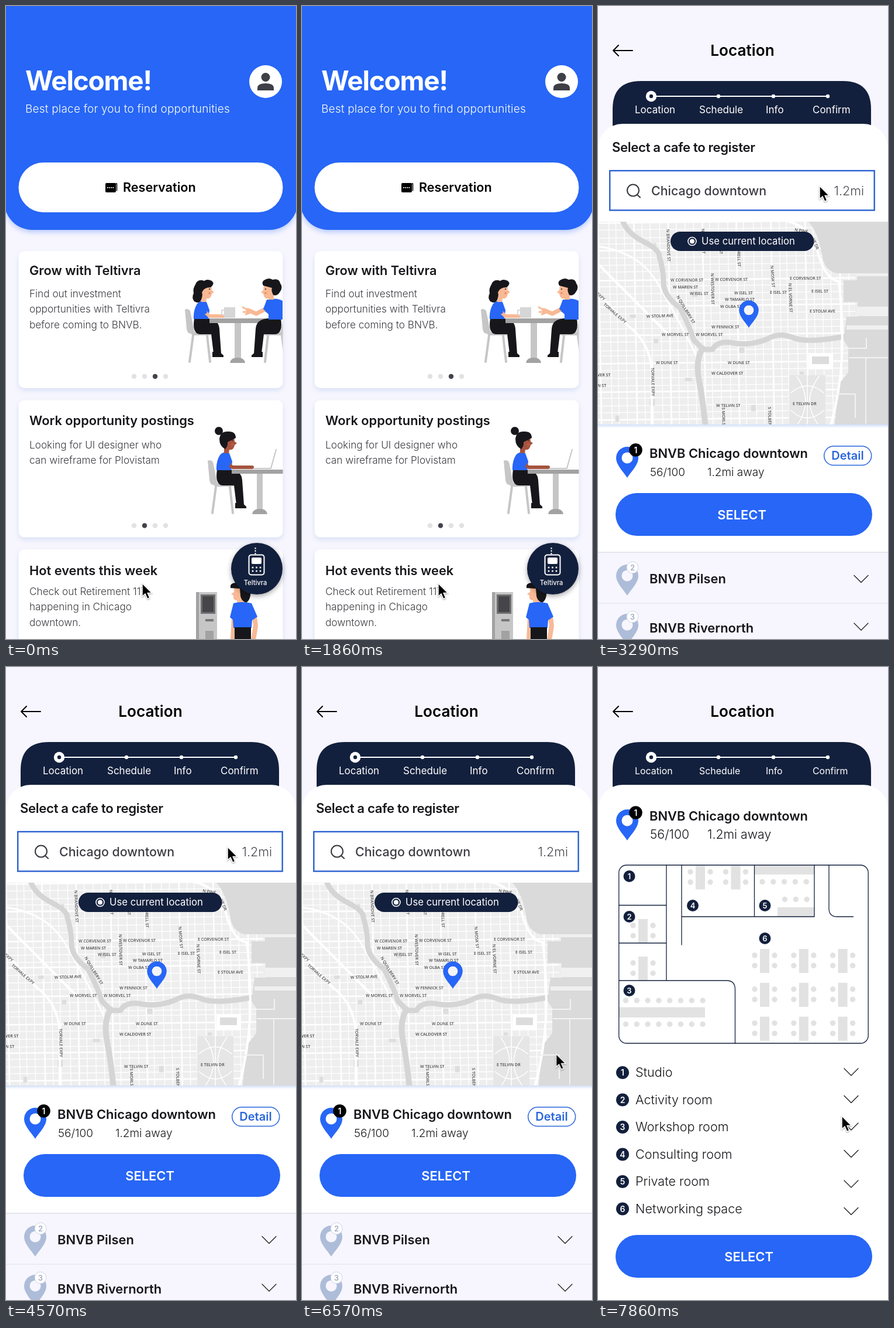
An HTML page that plays this animation: 496x1080 px, repeating every 8000 ms.

```html
<!DOCTYPE html>
<html lang="en">
<head>
<meta charset="utf-8">
<title>Reservation app</title>
<style>
html, body { margin: 0; width: 100%; height: 100%; overflow: hidden; background: #f7f6fe; }
svg { display: block; width: 100%; height: 100%; }
text { font-family: Inter, sans-serif; white-space: pre; }
.street { font: 600 7px "Open Sans", sans-serif; fill: #4a4a4a; }
.card { fill: #fff; filter: drop-shadow(0 4px 4px rgba(110, 150, 215, .22)); }
.line { fill: none; stroke-linecap: round; stroke-linejoin: round; }
</style>
</head>
<body>
<svg id="stage" viewBox="0 0 496 1080"></svg>
<script>
const BLUE = '#2766f6', NAVY = '#13203d', INK = '#17171b', GREY = '#e2e2e2';
const SKIN = '#f8b995', BROWN = '#a5533f', STEEL = '#a2a2a2', PALE = '#c6c6c6';
const DURATION = 8000, STEPS = 56;

const list = (items, fn) => items.map(fn).join('');
const range = n => [...Array(n).keys()];
const text = (x, y, str, size, weight = 400, fill = INK, extra = '') =>
  `<text x="${x}" y="${y}" font-size="${size}" font-weight="${weight}" fill="${fill}" ${extra}>${str}</text>`;
const middle = 'text-anchor="middle"';
const rect = (x, y, w, h, fill, rx = 0, extra = '') =>
  `<rect x="${x}" y="${y}" width="${w}" height="${h}" rx="${rx}" fill="${fill}" ${extra}/>`;
const circle = (x, y, r, fill, extra = '') => `<circle cx="${x}" cy="${y}" r="${r}" fill="${fill}" ${extra}/>`;
const path = (d, fill, extra = '') => `<path d="${d}" fill="${fill}" ${extra}/>`;
const line = (d, color, width) => `<path class="line" d="${d}" stroke="${color}" stroke-width="${width}"/>`;
const group = (transform, body) => `<g transform="${transform}">${body}</g>`;
const paragraph = (x, y, lines) => list(lines, (s, i) => text(x, y + i * 26.7, s, 17.2, 300, '#3c3c42'));
const chevron = (x, y) => line(`M${x} ${y}l12 12 12-12`, '#222', 1.4);
const badge = (x, y, r, n, fill, color = '#fff', size = 13, extra = '') =>
  circle(x, y, r, fill, extra) + text(x, y + size * .365, n, size, 600, color, middle);
const pin = (x, y, k, fill, hole) => group(`translate(${x} ${y}) scale(${k})`,
  path('M0 34C-5 25-19 13-19 0A19 19 0 0 1 19 0C19 13 5 25 0 34Z', fill) + circle(0, 0, 9.5, hole));
const button = (y, x) => rect(30, y, 439, 73, BLUE, 36.5) + text(x, y + 45, 'SELECT', 21.9, 600, '#fff', middle);

// ---------- people ----------
const seated =
  path('M306 518q5-3 9 2l8 39h-8q-5-1-6-8z', PALE) + rect(317, 556, 34, 6, PALE, 3) +
  line('M320 562l-6 45M344 562l5 45', PALE, 4) +
  path('M322 533h23q19 2 20 18l3 42h-13l-4-33h-20q-13-2-9-27z', INK) +
  path('M353 590h12l7 6v3h-19z', INK);
const torso = path('M327 508q8-8 16-3l5 14-2 15h-25q-1-15 6-26z', BLUE);
const face = skin => path('M334 476h17l1 9 4 3-4 3q-2 10-9 8l-1 6h-8z', skin) + circle(348, 490, 2, '#e8694f', 'opacity=".5"') +
  circle(348, 483, 1, INK);

const meeting =
  seated + torso + face(SKIN) +
  path('M350 480q8-6 2-11-8-4-13 0-11-4-15 6-5 8-3 15-4 8 1 14 9 5 12-3 3-9 1-12 3-9 15-9z', INK) +
  line('M338 520l10 9h34', SKIN, 6) + path('M331 509h9l4 15-7 3z', BLUE) +
  rect(373, 514, 19, 18, '#d6d6d6') + line('M373 519h-4v8h4', '#d6d6d6', 2) +
  rect(348, 533, 95, 8, STEEL) + rect(391, 541, 11, 60, PALE) + path('M383 609q1-9 13-9t13 9z', STEEL) +
  group('translate(792 0) scale(-1 1)', seated + path('M319 503q10-6 23-2l10 18-9 6v10h-24z', BLUE) + face(SKIN) +
    path('M352 477q4-7-3-10-7-4-13 0-11-3-13 6-5 7 0 14 5 9 12 6 4-8 2-12z', INK)) +
  line('M446 516l-18 9-14-6', SKIN, 7) + line('M414 519l-9-5M415 522h-9M418 523l-8 3', SKIN, 3) +
  path('M446 501h17l-6 18-8 7-9-9z', BLUE);

const designer = group('translate(39 258)',
  seated + torso + face(BROWN) + circle(325, 467, 7, INK) +
  path('M354 479q0-11-12-11-15-1-16 13 0 12 10 17 5-6 4-12z', INK) +
  line('M340 522l8 7h34', BROWN, 6) + path('M328 508q9-2 12 5l5 12-8 5z', BLUE)) +
  rect(386, 791, 90, 7, STEEL) + rect(429, 798, 10, 62, PALE) + path('M421 867q1-9 13-9t13 9z', STEEL) +
  line('M424 789h29l9-32', PALE, 2);

const visitor =
  rect(325, 1000, 36, 90, PALE) + rect(325, 1000, 5, 90, STEEL) + rect(333, 1004, 25, 33, '#6e6e6e') +
  rect(336, 1007, 19, 27, '#46464a') + rect(341, 1046, 14, 4, '#777') + rect(341, 1066, 14, 20, STEEL) +
  path('M390 992h18v14l-2 14h-10l-1-6q-7 0-6-8l-4-3 5-3z', SKIN) +
  path('M384 993q-2-8 8-9 22-6 26 10 2 18-7 24-8-2-10-11l-1-13z', INK) +
  line('M390 1042l-2 40M425 1042l2 16-4 24', SKIN, 8) +
  path('M389 1019q14-4 31 0l10 23-9 6-1 13h-31l-1-14-5-4z', BLUE) + rect(391, 1060, 28, 24, INK);

// ---------- home ----------
const dots = (y, active) => list(range(4), i => circle(219 + 18 * i, y, 4.2, i === active ? '#42424b' : GREY));
const callButton =
  circle(429, 960, 44, NAVY, 'style="filter:drop-shadow(0 3px 4px rgba(0,0,0,.35))"') +
  `<path d="M426.500 924v12" stroke="#fff" stroke-width="2" stroke-dasharray="2.500 2"/>` +
  rect(415.5, 936.5, 26, 34, NAVY, 4, 'stroke="#fff" stroke-width="2"') + rect(420, 941, 17, 11, '#fff', 2) +
  list(range(6), i => circle(422 + i % 3 * 6.5, 958 + (i > 2) * 6, 1.5, '#fff')) +
  text(426.5, 988, 'Teltivra', 11.2, 500, '#fff', middle);

const home =
  rect(0, 0, 496, 1080, '#f7f6fe') +
  rect(-3, -60, 502, 442, BLUE, 48, 'style="filter:drop-shadow(0 4px 4px rgba(39,102,246,.3))"') +
  text(33, 144, 'Welcome!', 46, 700, '#fff', 'letter-spacing="-1.2"') +
  text(33, 182, 'Best place for you to find opportunities', 19, 300, '#fff', 'letter-spacing=".2"') +
  circle(444, 129, 28, '#fff') + circle(444, 121.5, 7.5, '#3f3f47') +
  path('M430 144v-4q0-8 14-8t14 8v4z', '#3f3f47') +
  rect(21.5, 267, 452, 85, '#fff', 42.5) +
  rect(170, 302, 18, 16, '#000', 2) + line('M188 303h1.500v12', '#000', 1.5) +
  list(range(4), i => rect(173 + 3.2 * i, 309, 1.8, 1.8, '#fff')) +
  text(200, 317.3, 'Reservation', 21.6, 600, '#000') +
  list([418, 672.5, 927], y => `<rect class="card" x="21.500" y="${y}" width="452" height="234" rx="10"/>`) +
  text(40, 459, 'Grow with Teltivra', 21.8, 600) +
  paragraph(40, 496.5, ['Find out investment', 'opportunities with Teltivra', 'before coming to BNVB.']) + dots(632, 2) +
  text(40, 715, 'Work opportunity postings', 21.8, 600) +
  paragraph(40, 754.5, ['Looking for UI designer who', 'can wireframe for Plovistam']) + dots(886.5, 1) +
  text(40, 971, 'Hot events this week', 21.8, 600) +
  paragraph(40, 1004.5, ['Check out Retirement 117', 'happening in Chicago', 'downtown.']) +
  `<g clip-path="url(#cards)">${meeting}${designer}${visitor}</g>` + callButton;

// ---------- location ----------
const header = size =>
  rect(0, 0, 496, 1080, '#f7f6fe') + line('M59 76H26l9-9M26 76l9 9', '#000', 2) +
  text(247, 85, 'Location', 26.2, 600, '#000', middle) +
  path('M25 250V176Q25 128 73 128H419Q467 128 467 176V250Z', NAVY) +
  line('M91 154H393', '#fff', 1.8) + circle(91, 154, 9.2, '#fff') + circle(91, 154, 3.2, NAVY) +
  list([206, 300, 393], x => circle(x, 154, 3.2, '#fff')) +
  list([[63, 'Location'], [173, 'Schedule'], [287, 'Info'], [367, 'Confirm']],
    ([x, s]) => text(x, 182.5, s, size, 400, '#fff')) +
  rect(0, 201, 496, 940, '#fff', 42);

const streets = [
  [124, 470, 'W CORVENOR ST'], [200, 469, 'W CORVENOR ST'], [128, 482, 'W MAREN ST'], [157, 493, 'W ISEL ST'],
  [233, 492, 'W ISEL ST'], [294, 491, 'E ISEL ST'], [328, 467, 'E CORVENOR ST'], [365, 489, 'E ISEL ST'],
  [217, 503, 'W TAMARLO ST'], [209, 515, 'W OLBA ST'], [83, 532, 'W STOLM AVE', -2], [362, 523, 'E STOLM AVE'],
  [194, 550, 'W FENNICK ST'], [109, 563, 'W MORVEL ST'], [167, 563, 'W MORVEL ST'], [99, 611, 'W DUNE ST'],
  [222, 611, 'W DUNE ST'], [194, 629, 'W CALDOVER ST'], [-1, 632, 'VER ST'], [-1, 650, 'N ST'],
  [202, 684, 'W TELVIN ST'], [333, 681, 'E TELVIN DR'], [117, 381, 'N BRANDOVE ST', 88],
  [134, 496, 'N QUILLBERY ST', 59], [193, 456, 'N WESTOVER ST', 89], [238, 414, 'DRELL ST', 88],
  [177, 380, 'N OLVERS ST', 88], [207, 396, 'TORL ST', 88], [295, 443, 'N MOSK ST', 86],
  [326, 473, 'N EL VORNE ST', 88], [91, 617, 'TORVALE EXPY', 89], [212, 685, 'S MORLS', 89],
  [291, 684, 'S TOLBEN', 89], [9, 510, 'TORVALE EXPY', 41], [-3, 492, 'EXPY', 41],
  [336, 384, 'N PINE', 8], [366, 398, 'VE DR', 68]];

let seed = 7;
const random = () => (seed = seed * 16807 % 2147483647) / 2147483647;
const roads = (count, gap, make) => list(range(count), i => {
  const at = i * gap + random() * 4;
  return `<path d="${make(at)}" stroke="#fff" stroke-width="${i % 4 ? 1.3 : 2.6}"/>`;
});
const river = 'M42 366Q50 388 78 402T105 428Q112 450 112 472T140 515Q156 545 164 570L180 586H196Q204 570 232 575T290 568Q310 556 334 566T425 563';
const map = `<g clip-path="url(#map)">` +
  rect(0, 368, 496, 346, '#eeeeee') +
  roads(30, 14.6, x => `M${x} 368l6 346`) + roads(29, 12, y => `M0 ${y + 369}L440 ${y + 364}`) +
  list(range(12), () => rect(random() * 380, 380 + random() * 320, 5 + random() * 8, 5 + random() * 8, '#dedede')) +
  line('M-5 484L52 546Q88 574 92 620V720M0 440L120 560', '#fff', 4) +
  line('M0 410Q70 420 100 470T170 600', '#fff', 3) +
  line(river, '#d5d5d5', 9) + line('M179 584Q166 604 173 640T184 720', '#d5d5d5', 10) +
  rect(327, 630, 62, 90, '#e6e6e6') +
  line('M358 630v90M330 660q28-24 56 0M330 690q28 26 56 0M340 632q30 42 0 84M378 632q-32 42 0 84', '#fff', 1.5) +
  rect(360, 592, 42, 28, '#fff') + rect(366, 598, 29, 13, '#dcdcdc') +
  path('M360 368Q378 388 384 430Q390 454 410 456H443V468H420V505H444V530H425L420 570 428 582V625L412 645 404 720H500V368Z', '#dadada') +
  line('M318 366Q364 374 376 420T412 470Q420 540 417 600T398 716', '#fff', 4) +
  rect(443, 456, 60, 5, '#f0f0f0') + rect(443, 513, 60, 16, '#f0f0f0') + rect(425, 545, 75, 7, '#f0f0f0') +
  line('M429 584h30v-17M430 600h70M458 600v112M408 662h32v40', '#f2f2f2', 2) +
  list(streets, ([x, y, s, turn = 0]) => `<text class="street" transform="translate(${x} ${y}) rotate(${turn})">${s}</text>`) +
  '</g>';

const row = (y, n, name) =>
  pin(50, y - 5, 1, '#adbcd8', '#f7f6fe') +
  badge(59, y - 19, 10, n, '#fff', '#a3aec4', 13, 'stroke="#cdd4e3"') +
  text(88, y + 8, name, 21.9, 600);

const place = y => pin(50, y, 1, BLUE, '#fff') + badge(64.5, y - 13.5, 11.3, 1, '#000', '#fff', 14);

const cafeSearch = header(17) +
  text(24, 248.5, 'Select a cafe to register', 22.2, 600, INK, 'letter-spacing="-.35"') +
  rect(20.2, 281, 452.5, 67.5, '#fff', 0, 'stroke="#2a60d2" stroke-width="2.400"') +
  circle(60, 314.5, 10, 'none', 'stroke="#38383f" stroke-width="2"') + line('M67 322l5 4.500', '#38383f', 2.2) +
  text(91, 323, 'Chicago downtown', 21.4, 500, '#3c3c44') +
  text(455, 323, '1.2mi', 21.5, 300, '#4a4a50', 'text-anchor="end"') +
  map + rect(0, 714, 496, 6, 'url(#edge)') +
  rect(124, 385, 245.5, 33, NAVY, 16.5) + circle(161, 401.5, 7, 'none', 'stroke="#fff" stroke-width="1.600"') +
  circle(161, 401.5, 4, '#fff') + text(177, 407.3, 'Use current location', 16.7, 400, '#fff') +
  pin(258, 519, .88, BLUE, '#f4f4f6') + place(771) +
  text(88, 770.5, 'BNVB Chicago downtown', 21.9, 600) +
  text(89, 802, '56/100', 19, 300) + text(187, 802, '1.2mi away', 19, 300) +
  rect(386.7, 751, 81, 32.5, '#fff', 16.2, 'stroke="#2a66dc" stroke-width="1.500"') +
  text(427, 774.3, 'Detail', 20, 600, '#2a66dc', middle) + button(831, 246) +
  rect(0, 932, 496, 148, '#f7f6fe') + rect(0, 931.5, 496, 1, '#cdd0dc') + rect(0, 1018.5, 496, 1, '#dfe1ec') +
  row(977, 2, 'BNVB Pilsen') + row(1061, 3, 'BNVB Rivernorth') + chevron(438, 971.5) + chevron(438, 1053);

// ---------- floor plan ----------
const seat = (x, y) => circle(x, y, 4.7, GREY);
const seatRow = (x, y, n) => list(range(n), i => seat(x + 18.8 * i, y));
const desk = ([x, y]) => rect(x - 8, y, 16, 41, GREY) +
  list([11, 28.5], dy => seat(x - 17, y + dy) + seat(x + 17, y + dy));
const desks = [[77, 430], [77, 494], [175, 338.5], [235.5, 338.5],
  ...range(9).map(i => [285 + i % 3 * 66.8, 481 + Math.floor(i / 3) * 57.8])];
const rooms = ['Studio', 'Activity room', 'Workshop room', 'Consulting room', 'Private room', 'Networking space'];

const floorPlan = header(15.9) + place(262) +
  text(88, 262.3, 'BNVB Chicago downtown', 21.9, 600) +
  text(89, 293, '56/100', 21.3, 300) + text(187, 293, '1.2mi away', 21.3, 300) +
  list(desks, desk) +
  rect(268, 338, 102, 16, GREY) + seatRow(281, 366.5, 5) + seatRow(319.5, 396.5, 3) + rect(307, 410, 63, 16, GREY) +
  seatRow(47.5, 569, 8) + rect(36, 580.5, 147, 17.5, GREY) + seatRow(47.5, 609.5, 8) +
  rect(35.7, 338, 426.5, 304, 'none', 13, `stroke="${NAVY}" stroke-width="1.300"`) +
  line('M117 338V535M36 406.500H117M36 471H117M36 535H220Q234.500 535 234.500 550V642M143 338V474M143 426H370V338M267.500 338V426M395 338V412Q395 426 409 426H436.500', NAVY, 1.3) +
  list([[53.5, 357], [53.5, 426], [53.5, 552], [162, 407], [285.5, 407], [285.5, 463]],
    ([x, y], i) => badge(x, y, 10, i + 1, NAVY)) +
  list(rooms, (name, i) => {
    const y = 692 + 46.5 * i;
    return badge(42, y, 11, i + 1, NAVY, '#fff', 14) + text(64, y + 7.3, name, 21.6, 300) +
      chevron(421, y - 7 + (i > 3 ? 5 : 0));
  }) + button(969, 258);

const pointer = path('M0 0V22.500L5 18 8.800 26.500 12.800 24.800 9.200 16.400H16.500Z', '#000',
  'stroke="#fff" stroke-width="1.500" style="filter:drop-shadow(0 1px 1px rgba(0,0,0,.4))"');

document.getElementById('stage').innerHTML = `<defs>
  <clipPath id="cards"><path d="M21 418H473.500V1080H21Z"/></clipPath>
  <clipPath id="map"><path d="M0 368H496V714H0Z"/></clipPath>
  <linearGradient id="edge" x2="0" y2="1"><stop stop-color="#cfdffb"/><stop offset="1" stop-color="#fff"/></linearGradient>
</defs>
<g id="home">${home}</g><g id="location">${cafeSearch}</g><g id="detail">${floorPlan}</g><g id="cursor">${pointer}</g>`;

// ---------- motion ----------
// One held keyframe per step, so every change is a hard one.
const play = (id, poseAt) => document.getElementById(id).animate(
  range(STEPS + 1).map(n => ({ offset: n / STEPS, easing: 'step-end', ...poseAt(n) })),
  { duration: DURATION, iterations: Infinity });

const show = (id, from, to) => play(id, n => ({ opacity: n >= from && n < to ? 1 : 0 }));
const OPEN_SEARCH = 23, OPEN_DETAIL = 52;
show('home', 0, OPEN_SEARCH);
show('location', OPEN_SEARCH, OPEN_DETAIL);
show('detail', OPEN_DETAIL, STEPS + 1);

// step, x, y
const stops = [[0, 233, 985], [14, 233, 985], [20, 379, 307], [41, 379, 307], [46, 441, 701], [49, 417, 766], [STEPS, 417, 766]];
play('cursor', n => {
  const i = Math.max(1, stops.findIndex(s => s[0] >= n));
  const [a, b] = [stops[i - 1], stops[i]];
  const p = (n - a[0]) / (b[0] - a[0]), k = p * p * (3 - 2 * p);
  return { transform: `translate(${a[1] + (b[1] - a[1]) * k}px, ${a[2] + (b[2] - a[2]) * k}px)` };
});
</script>
</body>
</html>
```
